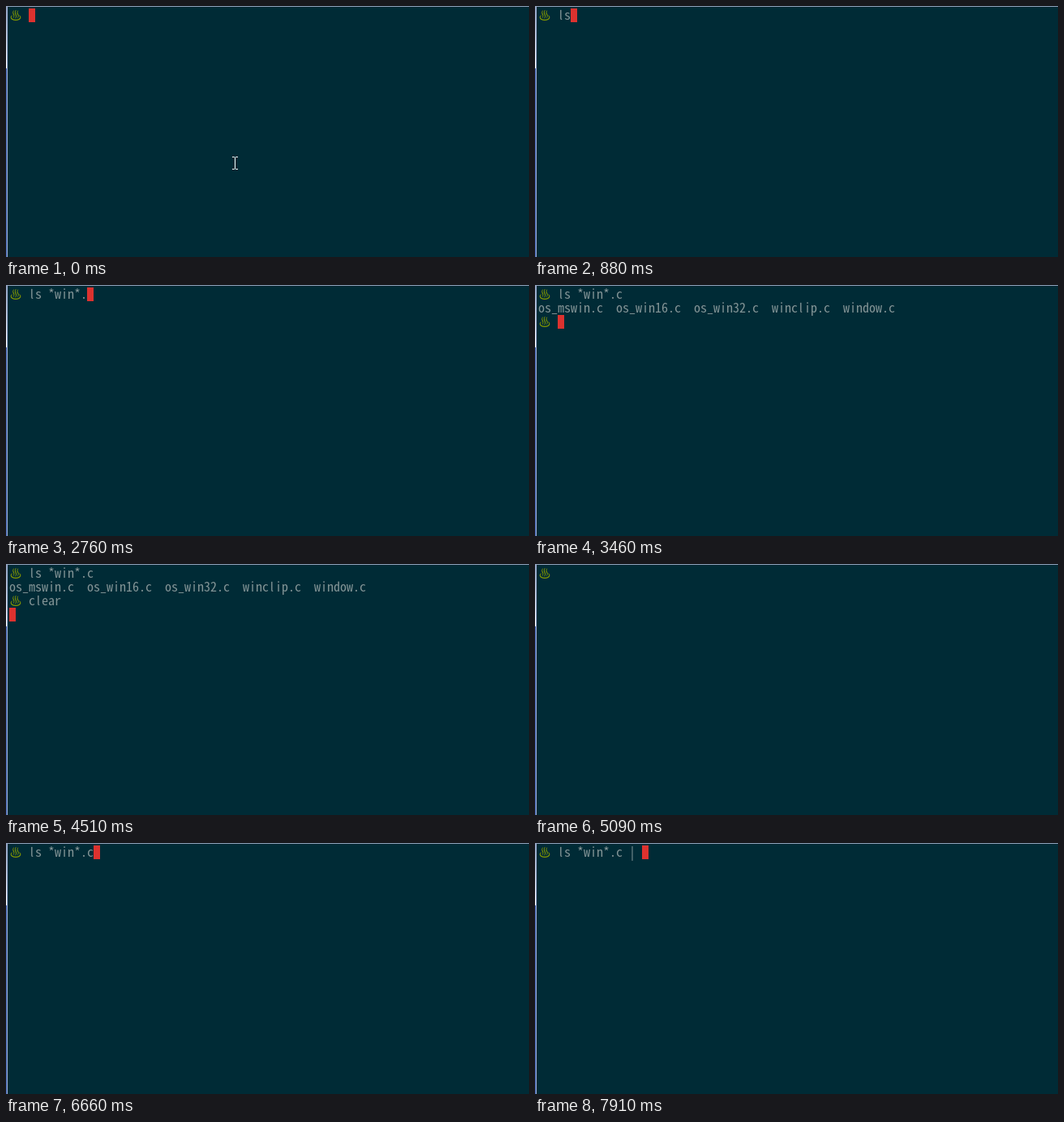
Animation of 645x310 px, one loop 8 s. Source, as an HTML page with a canvas:

```html
<!DOCTYPE html>
<html lang="en">
<head>
<meta charset="utf-8">
<title>Terminal session</title>
<style>
  html, body { margin: 0; width: 645px; height: 310px; overflow: hidden; background: #002b36; }
  canvas { display: block; }
</style>
</head>
<body>
<canvas id="stage" width="645" height="310"></canvas>
<script>
const ctx = document.getElementById('stage').getContext('2d');
const LOOP = 8000, CELL = 8, ROW = 17, LEFT = 4, TOP = 3;
const POINTER_HIDES = 810;
const MONO = '16px "Noto Sans Mono CJK JP", "Noto Sans CJK JP", monospace';
const SANS = '15px "Noto Sans CJK JP", "Noto Sans", sans-serif';
const PROMPT = '♨  ';
const LIST = 'ls *win*.c';
const FILES = 'os_mswin.c  os_win16.c  os_win32.c  winclip.c  window.c';

// Each state: start time, screen text, block cursor visible. The cursor sits at the end of the text.
const states = [];
const show = (time, text, cursor = true) => states.push({ time, text, cursor });
const type = (before, keys, times) =>
  times.forEach((time, i) => show(time, before + keys.slice(0, i + 1)));

show(0, PROMPT);
show(250, PROMPT, false);
show(740, PROMPT);
type(PROMPT, 'ls *', [810, 880, 1100, 1350]);
show(1880, PROMPT + 'ls *', false);
type(PROMPT + 'ls *', 'win*.c', [2030, 2180, 2270, 2510, 2760, 2910]);
show(3370, PROMPT + LIST + '\n');
const listed = PROMPT + LIST + '\n' + FILES + '\n' + PROMPT;
show(3460, listed);
type(listed, 'clear', [3950, 4045, 4140, 4235, 4330]);
show(4510, listed + 'clear\n');
show(4600, PROMPT);
show(5090, PROMPT, false);
show(5610, PROMPT);
show(5760, PROMPT + 'clear');
show(6280, PROMPT + 'clear', false);
show(6660, PROMPT + LIST);
show(7120, PROMPT + LIST, false);
show(7270, PROMPT + LIST + ' ');
show(7730, PROMPT + LIST + ' ', false);
type(PROMPT + LIST + ' ', '| ', [7820, 7910]);

function box(color, x, y, w, h) {
  ctx.fillStyle = color;
  ctx.fillRect(x, y, w, h);
}

function drawWindow() {
  box('#002b36', 0, 0, 645, 310);
  const edge = ctx.createLinearGradient(0, 0, 0, 77);
  edge.addColorStop(0, '#8797b5');
  edge.addColorStop(1, '#ffffff');
  box(edge, 0, 0, 1, 77);
  box('#3a5cb0', 0, 77, 1, 233);
  box('#a3b4da', 1, 0, 1, 310);
  box('#93a3bb', 0, 0, 645, 1);
}

function drawGlyph(char, x, baseline) {
  const spring = char === '♨';
  ctx.font = spring || 'il'.includes(char) ? SANS : MONO;
  ctx.fillStyle = spring ? '#859900' : '#839496';
  ctx.fillText(char, x + (spring ? CELL : CELL / 2), baseline);
}

function drawPointer() {
  for (const y of [186, 201]) {
    box('#ffffff', 279, y, 3, 1);
    box('#ffffff', 283, y, 3, 1);
  }
  box('#ffffff', 282, 187, 1, 14);
}

function draw(t) {
  const { text, cursor } = states.findLast(s => s.time <= t);
  const lines = text.split('\n');
  drawWindow();
  ctx.textAlign = 'center';
  lines.forEach((line, row) => {
    [...line].forEach((char, col) => {
      if (char !== ' ') drawGlyph(char, LEFT + col * CELL, TOP + row * ROW + 14);
    });
  });
  if (cursor) {
    const row = lines.length - 1;
    box('#dc322f', LEFT + lines[row].length * CELL, TOP + row * ROW, CELL, ROW);
  }
  if (t < POINTER_HIDES) drawPointer();
}

const start = performance.now();
function tick() {
  draw((performance.now() - start) % LOOP);
  requestAnimationFrame(tick);
}
tick();
</script>
</body>
</html>
```
